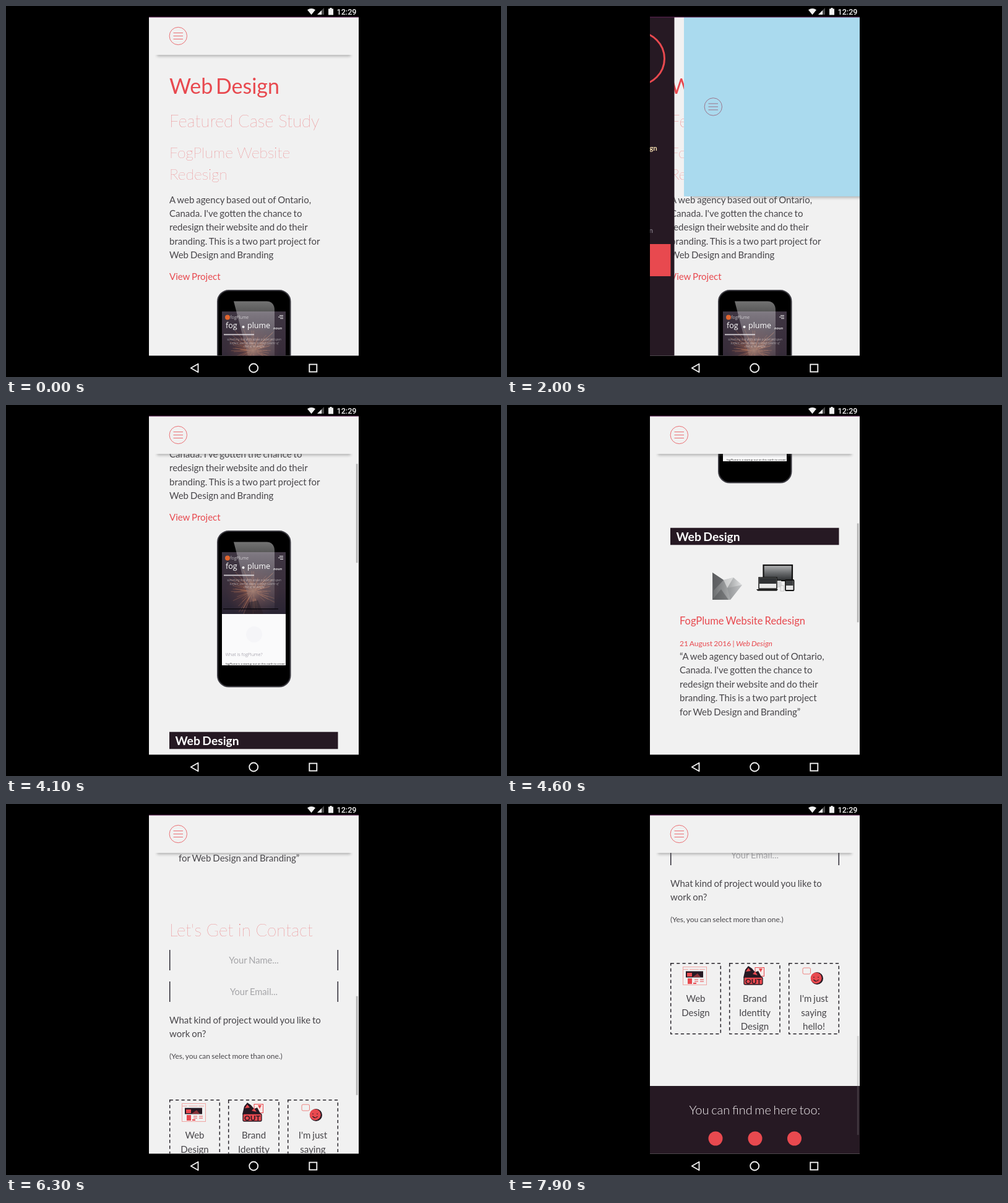
Recreate the animation shown at these times as an HTML page. Size 800 by 600 pixels, loop 8 s.

```html
<!DOCTYPE html>
<html lang="en">
<head>
<meta charset="utf-8">
<title>Mobile portfolio</title>
<style>
  html, body { margin: 0; width: 100%; height: 100%; overflow: hidden; background: #000; }
  svg { display: block; width: 800px; height: 600px; }
  text { font-family: Lato, sans-serif; font-size: 15px; word-spacing: -.06em; fill: #48464a; white-space: pre; }
  .mid text, text.mid { text-anchor: middle; }
  .red, .red text { fill: #e8494f; }
  .h1 { font-size: 34px; word-spacing: -.12em; }
  .h2 { font-size: 27.5px; font-weight: 200; word-spacing: 0; }
  .h3 { font-size: 24.7px; font-weight: 200; word-spacing: 0; }
  .h4 { font-size: 16.5px; }
  .small { font-size: 12px; }
  .hint text { font-size: 14.7px; fill: #a5a5a8; }
  .bar { font-size: 19.3px; font-weight: 700; fill: #fff; }
  .foot { font-size: 20px; font-weight: 300; word-spacing: -.09em; fill: #f4f0f2; }
  .menu text { font-size: 11.5px; font-weight: 700; fill: #77707a; }
  .menu .on { fill: #f3dcae; }
  .menu .cta { fill: #fff; }
  .clock { font: 500 12.6px Roboto, sans-serif; fill: #f2f2f2; }
  .app text { font-family: "Open Sans", sans-serif; font-weight: 300; word-spacing: 0; fill: #fff; }
  .app .name { font-size: 12.5px; font-weight: 400; }
  .app .fine text { font-size: 4.6px; font-style: italic; }
</style>
</head>
<body>
<svg viewBox="0 0 800 600">
  <defs>
    <clipPath id="view"><rect x="231" y="18" width="339" height="547.500"/></clipPath>
    <clipPath id="lcd"><rect x="349" y="494" width="103" height="183"/></clipPath>
    <filter id="soft" x="-10%" y="-200%" width="120%" height="500%"><feGaussianBlur stdDeviation="2.2"/></filter>
    <linearGradient id="gloss" x1="0" y1="0" x2="0" y2="1">
      <stop offset="0" stop-color="#fff" stop-opacity=".45"/>
      <stop offset=".2" stop-color="#fff" stop-opacity=".32"/>
      <stop offset="1" stop-color="#fff" stop-opacity=".04"/>
    </linearGradient>
    <linearGradient id="dusk" x1="0" y1="0" x2="0" y2="1">
      <stop offset="0" stop-color="#3f3643"/>
      <stop offset=".6" stop-color="#382d3a"/>
      <stop offset="1" stop-color="#292433"/>
    </linearGradient>
    <radialGradient id="glow">
      <stop offset="0" stop-color="#d99a78" stop-opacity=".6"/>
      <stop offset=".4" stop-color="#85504a" stop-opacity=".35"/>
      <stop offset="1" stop-color="#6a4040" stop-opacity="0"/>
    </radialGradient>
    <linearGradient id="rock" x1="0" y1="0" x2="1" y2="0">
      <stop offset="0" stop-color="#6a6c6e"/>
      <stop offset=".6" stop-color="#a9abac"/>
      <stop offset="1" stop-color="#e2e3e4"/>
    </linearGradient>
    <linearGradient id="slate" x1="0" y1="0" x2="0" y2="1">
      <stop offset="0" stop-color="#b4b5b6"/>
      <stop offset=".5" stop-color="#6a6c6e"/>
      <stop offset="1" stop-color="#2b2d2f"/>
    </linearGradient>
  </defs>

  <rect width="800" height="600"/>
  <g clip-path="url(#view)">
    <rect x="231" y="18" width="339" height="548" fill="#f1f1f1"/>

    <g id="page">
      <text class="h1 red" x="264" y="141.5">Web Design</text>
      <text class="h2 red" x="264" y="196">Featured Case Study</text>
      <text class="h3 red" x="264" y="245.5">FogPlume Website</text>
      <text class="h3 red" x="264" y="281">Redesign</text>
      <text x="264" y="318.5">A web agency based out of Ontario,</text>
      <text x="264" y="340.9">Canada. I've gotten the chance to</text>
      <text x="264" y="363.3">redesign their website and do their</text>
      <text x="264" y="385.7">branding. This is a two part project for</text>
      <text x="264" y="408.1">Web Design and Branding</text>
      <text class="red" x="264" y="443">View Project</text>

      <g class="app">
        <rect x="342" y="460" width="117.500" height="251.500" rx="18" stroke="#3c3b42" stroke-width="2"/>
        <g clip-path="url(#lcd)">
          <rect x="349" y="494" width="103" height="100" fill="url(#dusk)"/>
          <circle cx="399" cy="557" r="44" fill="url(#glow)"/>
          <path id="sparks" fill="none" stroke="#d88a62" stroke-width=".6" opacity=".5"/>
          <path d="M385 594l8-19 14-3 9 22z" fill="#2b2026" opacity=".7"/>
          <rect x="349" y="594" width="103" height="83" fill="#fafafb"/>
          <circle cx="401" cy="627" r="13" fill="#f5f5f8"/>
          <circle cx="358" cy="503.500" r="4" fill="#e2652f"/>
          <text x="362.500" y="506" style="font-size:7px">fogPlume</text>
          <path d="M442 500.500h6M440 503h8M443 505.500h5" stroke="#fff" stroke-width=".9"/>
          <text class="name" x="355" y="521">fog</text>
          <text class="name" x="390" y="521">plume</text>
          <circle cx="383.500" cy="519" r="2" fill="#fff"/>
          <text x="432" y="523" style="font-size:6px;font-weight:600;font-style:italic">noun</text>
          <rect x="352" y="530.500" width="49" height="1.800" fill="#cfcbd0"/>
          <g class="mid fine" opacity=".8">
            <text x="401" y="541">something that drifts above a quiet and open</text>
            <text x="401" y="546.500">surface, seen at dawn, a rising column of</text>
            <text x="401" y="552">mist of no weight</text>
          </g>
          <rect x="351" y="585" width="89" height="1.500" fill="#0d0a10"/>
          <text x="354.500" y="661.500" style="font-size:7.3px;fill:#85818f">What is fogPlume?</text>
          <text x="355" y="676" style="font-size:4.3px;font-weight:400;fill:#222">fogPlume is a startup out on this earth to create</text>
        </g>
        <path d="M368 477.500H421Q434 478 434 492V585H396Z" fill="url(#gloss)"/>
      </g>

      <rect x="264" y="784.700" width="272.500" height="27.600" fill="#261923"/>
      <text class="bar" x="273.500" y="805.500">Web Design</text>

      <path d="M332 857L350 869 366 865 380 877 361 901H332Z" fill="url(#rock)"/>
      <path d="M332 857L350 869 334 886Z" fill="#55575a" opacity=".7"/>
      <path d="M350 869L366 865 356 882Z" fill="#fff" opacity=".5"/>
      <path d="M356 882L380 877 361 901Z" fill="#85878a" opacity=".35"/>
      <path d="M332 901L346 884 358 901Z" fill="#4f5153" opacity=".5"/>

      <rect x="414.500" y="845" width="46.500" height="25" fill="url(#slate)" stroke="#111" stroke-width="2.200"/>
      <path d="M434 870h9l2 11h-13z" fill="#d4d5d6"/>
      <rect x="407" y="865" width="29" height="18" fill="#e8e8e8" stroke="#151515" stroke-width="1.500"/>
      <rect x="408" y="866" width="27" height="9" fill="#303234"/>
      <path d="M403 884h35l-2 2.500h-31z" fill="#111"/>
      <rect x="450" y="869" width="13.500" height="17" rx="1" fill="#e6e6e6" stroke="#111" stroke-width="1.800"/>
      <rect x="451" y="870" width="11.500" height="8" fill="#3c3e40"/>
      <rect x="442" y="878" width="5.500" height="9" fill="#eee" stroke="#bbb" stroke-width=".8"/>

      <text class="h4 red" x="279" y="941">FogPlume Website Redesign</text>
      <text class="small red" x="279" y="975.500">21 August 2016 | <tspan font-style="italic">Web Design</tspan></text>
      <text x="279" y="998">“A web agency based out of Ontario,</text>
      <text x="279" y="1020.400">Canada. I've gotten the chance to</text>
      <text x="279" y="1042.800">redesign their website and do their</text>
      <text x="279" y="1065.200">branding. This is a two part project</text>
      <text x="279" y="1087.600">for Web Design and Branding”</text>

      <text class="h2 red" x="264" y="1208.500">Let's Get in Contact</text>
      <path d="M264.700 1231v33M536.300 1231v33M264.700 1282v33M536.300 1282v33" stroke="#2b2833" stroke-width="1.500"/>
      <g class="hint mid">
        <text x="400.500" y="1253">Your Name...</text>
        <text x="400.500" y="1304.300">Your Email...</text>
      </g>
      <text x="264" y="1350">What kind of project would you like to</text>
      <text x="264" y="1372.400">work on?</text>
      <text class="small" x="264" y="1407.300">(Yes, you can select more than one.)</text>

      <g fill="none" stroke="#262329" stroke-width="1.500" stroke-dasharray="5.200 4.200">
        <rect x="264.700" y="1473.700" width="80.600" height="114"/>
        <rect x="359.700" y="1473.700" width="81.300" height="114"/>
        <rect x="455.700" y="1473.700" width="80.600" height="114"/>
      </g>
      <g class="mid">
        <text x="305" y="1536.300">Web</text>
        <text x="305" y="1558.700">Design</text>
        <text x="400.500" y="1536.300">Brand</text>
        <text x="400.500" y="1558.700">Identity</text>
        <text x="400.500" y="1581.100">Design</text>
        <text x="496" y="1536.300">I'm just</text>
        <text x="496" y="1558.700">saying</text>
        <text x="496" y="1581.100">hello!</text>
      </g>

      <g fill="none" stroke="#f0a6a4">
        <rect x="284.500" y="1479.500" width="38" height="29"/>
        <path d="M284 1483.500h39" stroke-dasharray="9 2 15 1"/>
        <path d="M303 1500h6M312 1500h6M303 1503h6M312 1503h6" stroke="#e8494f"/>
      </g>
      <rect x="289" y="1486.500" width="28" height="10" fill="#261923"/>
      <path d="M291 1489h8v6h-8zM292 1498h7v9h-7zM301 1505h5v2h-5z" fill="#e8494f"/>
      <path d="M300 1496l8-6 5 6z" fill="#8d3138"/>

      <rect x="401" y="1480.500" width="14.500" height="14" fill="#f7e7e5" stroke="#e8494f"/>
      <path d="M382 1497l3-13 5-6 6 4 5 6 5-2 6 11z" fill="#261923"/>
      <path d="M386 1487l4-6 4 5zM397 1491l4-4 4 6zM407 1482l6 0-3 6z" fill="#e8494f"/>
      <rect x="383" y="1496" width="30" height="12" rx="2" fill="#e8494f" stroke="#261923" stroke-width="1.300"/>
      <text class="mid" x="398" y="1506.500" style="font-size:12px;font-weight:700;fill:#261923">OUT</text>

      <rect x="478" y="1481" width="12.500" height="10" rx="2" fill="none" stroke="#ee8582"/>
      <circle cx="501" cy="1498" r="10" fill="#261923"/>
      <circle cx="499.700" cy="1497.500" r="9" fill="#e8494f"/>
      <path d="M495.500 1500q4.500 5 8 0M496 1495.500v1.500M503 1495.500v1.500" fill="none" stroke="#261923" stroke-width="1.200"/>

      <rect x="231" y="1672" width="339" height="130" fill="#261923"/>
      <text class="foot mid" x="400.500" y="1717.500">You can find me here too:</text>
      <g class="red">
        <circle cx="337" cy="1757" r="11.500"/>
        <circle cx="401" cy="1757" r="11.500"/>
        <circle cx="464.500" cy="1757" r="11.500"/>
      </g>
    </g>

    <rect id="thumb" x="565.800" width="2.800" height="160" fill="#858585"/>

    <g id="menu" class="menu mid">
      <rect width="117" height="548" y="18" fill="#261923"/>
      <circle cx="58.500" cy="85" r="42.500" fill="none" stroke="#e8494f" stroke-width="3"/>
      <text x="58.500" y="202">About</text>
      <text class="on" x="58.500" y="234">Web Design</text>
      <text x="58.500" y="267">Print</text>
      <text x="58.500" y="300">Logos</text>
      <text x="58.500" y="334">Type</text>
      <text x="58.500" y="367">Direction</text>
      <rect x="6" y="385" width="105" height="52" fill="#e8494f"/>
      <text class="cta" x="58.500" y="415">Hire</text>
    </g>

    <g id="header">
      <rect id="shade" x="244" y="-5" width="313" height="7.500" fill="#555" opacity=".38" filter="url(#soft)"/>
      <rect id="panel" x="231" y="18" width="339"/>
      <g id="burger" fill="none" stroke-width=".9" opacity=".85">
        <circle cx="278.300" r="14.200"/>
        <path d="M270.500-5h15.500M270.500 0h15.500M270.500 5h15.500"/>
      </g>
    </g>
  </g>

  <rect x="231" y="17.500" width="339" height="1" fill="#6b2a60"/>
  <g fill="#f2f2f2">
    <path d="M487 6.200Q493.500 1.800 500 6.200L493.500 14.300Z"/>
    <path d="M503 14L514 3V14Z" fill="#4c4c4c"/>
    <path d="M503 14L510 7V14Z"/>
    <path d="M521 4.500h2.500V3h3v1.500H529V14.500H521Z"/>
  </g>
  <text class="clock" x="534.500" y="13.500">12:29</text>
  <g fill="none" stroke="#f0f0f0" stroke-width="1.900">
    <path d="M310.500 578.800V592.200L298.800 585.500Z" stroke-linejoin="round"/>
    <circle cx="400.200" cy="585.500" r="7"/>
    <rect x="490.300" y="579.600" width="12" height="12"/>
  </g>
</svg>

<script>
const LOOP = 8000, STEP = 100, MENU = 117;
const $ = id => document.getElementById(id);
const [page, thumb, menu, header, shade, panel, burger] =
  ['page', 'thumb', 'menu', 'header', 'shade', 'panel', 'burger'].map($);
const clamp = x => Math.min(1, Math.max(0, x));
const smooth = x => x * x * (3 - 2 * x);
const move = (el, x, y) => el.setAttribute('transform', `translate(${x} ${y})`);

// Scroll stops: time, offset, ease-out power of the way there
const stops = [
  [2600, 0, 1], [2700, 13, 1], [2900, 165, 1], [3000, 165, 1], [3100, 216, 1], [3200, 222, 1],
  [4000, 222, 1], [4100, 256, 1], [4900, 640, 2],
  [5300, 640, 1], [5400, 663, 1], [6200, 994, 2], [6300, 995, 1],
  [6600, 995, 1], [7100, 1209, 1.6], [7200, 1209, 1], [7400, 1216, 1]
];

function scrollAt(t) {
  const i = stops.findIndex(s => s[0] > t);
  if (i === 0) return 0;
  if (i < 0) return stops[stops.length - 1][1];
  const [t0, from] = stops[i - 1], [t1, to, power] = stops[i];
  return from + (to - from) * (1 - (1 - (t - t0) / (t1 - t0)) ** power);
}

function thumbAlpha(t) {
  if (t < 2700) return 0;
  if (t < 4100) return clamp(1 - (t - 3500) / 400);
  return clamp(1 - (t - 7700) / 400);
}

function menuAt(t) {
  return t < 1500 ? smooth(clamp((t - 800) / 250)) : 1 - smooth(clamp((t - 1870) / 250));
}

function mix(a, b, p) {
  return `rgb(${a.map((v, i) => Math.round(v + (b[i] - v) * p))})`;
}

function drawSparks() {
  let seed = 7, d = '';
  const rnd = () => (seed = seed * 16807 % 2147483647) / 2147483647;
  for (let i = 0; i < 70; i++) {
    const a = rnd() * Math.PI * 2, r0 = 3 + rnd() * 14, r1 = r0 + 6 + rnd() * 24;
    const at = r => `${(399 + r * Math.cos(a)).toFixed(1)} ${(557 + r * Math.sin(a)).toFixed(1)}`;
    d += `M${at(r0)}L${at(r1)}`;
  }
  $('sparks').setAttribute('d', d);
}

function render(now) {
  const t = Math.floor(now % LOOP / STEP) * STEP;
  const y = scrollAt(t), p = menuAt(t), height = 61 + 487 * p;

  move(page, 0, -y);
  thumb.setAttribute('y', 20.5 + 0.2917 * y);
  thumb.setAttribute('opacity', 0.55 * thumbAlpha(t));

  move(menu, 231 - MENU + MENU * p ** 1.44, 0);
  move(header, MENU * p, 0);
  move(shade, 0, 18 + height);
  move(burger, 0, 18 + height / 2);
  panel.setAttribute('height', height);
  panel.setAttribute('fill', mix([241, 241, 241], [91, 192, 235], p));
  burger.setAttribute('stroke', mix([232, 73, 79], [60, 100, 140], p));
}

function tick() {
  render(performance.now());
  requestAnimationFrame(tick);
}

drawSparks();
tick();
</script>
</body>
</html>
```
